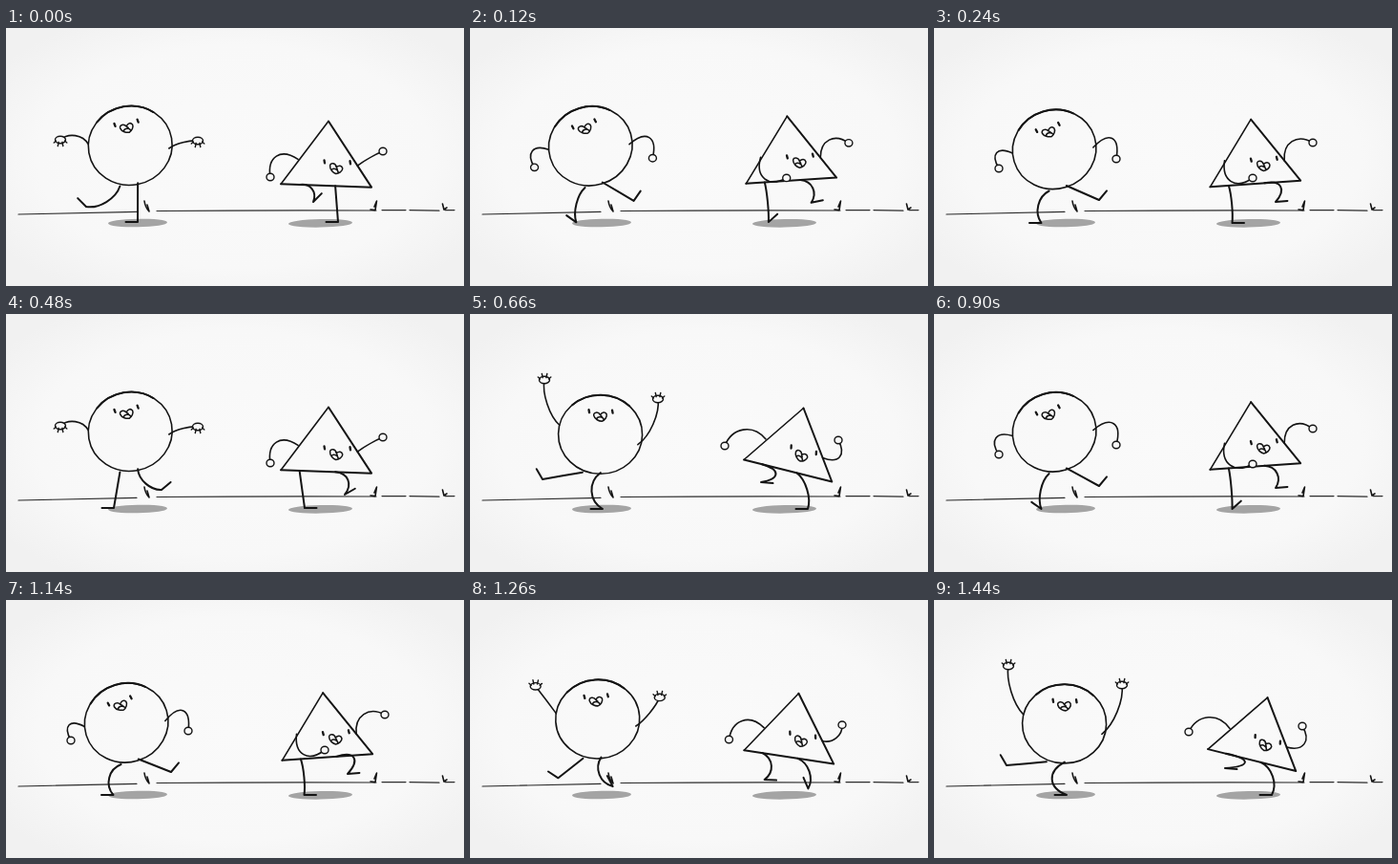
Write an HTML page that moves like this. It is 480x270 px and loops after 1500 ms.

```html
<!DOCTYPE html>
<html lang="en">
<head>
<meta charset="utf-8">
<title>Dancing shapes</title>
<style>
html, body { margin: 0; width: 100%; height: 100%; overflow: hidden; background: #f7f7f7; }
svg { display: block; width: 100vw; height: 100vh; }
path { fill: none; stroke: #141414; stroke-width: 1.6; stroke-linecap: round; stroke-linejoin: round; }
.bold { stroke-width: 2; }
.thin { stroke-width: 1.3; }
.eye { stroke-width: 2.3; }
.hand { fill: #f9f9f9; stroke-width: 1.4; }
.ground { stroke: #2c2c2c; stroke-width: 1.2; }
</style>
</head>
<body>
<svg viewBox="0 0 480 270" xmlns="http://www.w3.org/2000/svg">
  <defs>
    <radialGradient id="paper" cx="50%" cy="50%" r="62%">
      <stop offset="0" stop-color="#fafafa"/>
      <stop offset=".7" stop-color="#f8f8f8"/>
      <stop offset="1" stop-color="#f1f1f1"/>
    </radialGradient>
  </defs>
  <rect width="480" height="270" fill="url(#paper)"/>
  <g fill="#a4a4a4">
    <ellipse cx="138" cy="204" rx="31" ry="4.3" transform="rotate(-1 138 204)"/>
    <ellipse cx="329.5" cy="204.3" rx="33.5" ry="4.3" transform="rotate(-1 330 204)"/>
  </g>
  <path class="ground" d="M13 195 Q70 193.5 137 192.3 M158 191.5 Q270 190.5 388 191 M394 190.6 H419 M423 190.6 L454 191.2 M460 190.6 H470"/>
  <path d="M145 181 Q146 188 150 192 L148 185 M382 190 L387 190.6 L388.5 181 L386 187 M457.5 184 L459 190 L462 188"/>
  <g id="stage"></g>
</svg>
<script>
const LOOP = 1500, STEP = 60, CYCLE = 12.5;

// [beat, pose, hop] along one dance cycle; positive hop is a dip
const beats = [[0, 'pass', 0], [2.5, 'down', -3.5], [4, 'down', 0], [6.5, 'down', 1.5],
  [8, 'swap', 0], [9.5, 'up', 0], [11, 'up', 0], [11.5, 'up', 3.6], [CYCLE, 'pass', 0]];

// Arms are [hand x, y, bow]; legs are [ankle x, y, bow, toe angle].
// Shoulders, hips and face sit on the body and turn with its lean.
const round = {
  x: lean => 136 + lean * .58,
  outline: 'M-44 0 a44 41.3 0 1 1 88 0 a44 41.3 0 1 1 -88 0',
  edge: 'M-30 -30.2 A44 41.3 0 0 1 30 -30.2',
  mouth: [-.5, -18.5, 0], eyes: [-12.5, 12, -24],
  joints: { armL: [-43, -9], armR: [39.5, 10], legL: [-18, 40], legR: [1, 40] },
  toeLift: 10, fingers: { pass: 1, swap: 1, up: -1, down: 0 },
  poses: {
    pass: { lean: -10, y: 123, armL: [57, 117, -9], armR: [201, 118, 3], legL: [84, 187, 9, 225], legR: [138, 203, 0, 180] },
    down: { lean: -17, y: 127, armL: [68, 147, -17], armR: [191, 137, 23], legL: [112.5, 204, -10, 180], legR: [173, 180, 0, 310] },
    up: { lean: 1, y: 126, armL: [78, 69, 7], armR: [197, 89, -8], legL: [76, 173, 0, 240], legR: [139, 204, -14, 180] }
  },
  swap: { legL: [113, 203, 0, 180], legR: [163, 184, -8, 320] }
};
const tri = {
  x: lean => 336 - lean * .2,
  outline: 'M0 -67.5 L-47.5 0',
  edge: 'M0 -67.5 L47.5 0 H-47.5',
  mouth: [9.3, -18, 18], eyes: [-3, 24, -25],
  joints: { armL: [-30.5, -26.5], armR: [32, -22], legL: [-28, 0], legR: [9.5, 0] },
  toeLift: -12, fingers: { pass: 0, swap: 0, up: 0, down: 0 },
  poses: {
    pass: { lean: 2, y: 165, armL: [277, 156, -20], armR: [395, 129, 1], legL: [322, 182, 10, -45], legR: [348, 203, 0, 180] },
    down: { lean: -4, y: 163, armL: [334, 157, -20], armR: [397, 120, 17], legL: [312.5, 204, 2, 0], legR: [358, 182, 17, 355] },
    up: { lean: 14, y: 164, armL: [267, 138, -18], armR: [386, 132, -17], legL: [305, 176, 20, 5], legR: [354, 204, 7, 180] }
  },
  swap: { legL: [313, 203, 0, 0], legR: [355, 189, 12, 330] }
};

const limbs = ['legL', 'legR', 'armL', 'armR'];
const heart = 'M0 -2 C-2 -6 -8 -5 -7 -1 C-6 3 -1 5 2 5 C5 4 8 0 7 -3 C5 -6 2 -5 0 -2 L2 0 M-4 3 C-3 -1 3 0 4 3';
const rad = deg => deg * Math.PI / 180;
const lerp = (a, b, k) => Array.isArray(a) ? a.map((v, i) => lerp(v, b[i], k)) : a + (b - a) * k;

function add(parent, cls, d = '') {
  const el = document.createElementNS('http://www.w3.org/2000/svg', cls === 'group' ? 'g' : 'path');
  el.setAttribute('class', cls);
  if (d) el.setAttribute('d', d);
  return parent.appendChild(el);
}

// A limb from a to b, pushed sideways by bow
function bend([ax, ay], [bx, by], bow) {
  const dx = bx - ax, dy = by - ay, s = bow / Math.hypot(dx, dy);
  const at = k => `${ax + dx * k + dy * s} ${ay + dy * k - dx * s}`;
  return `M${ax} ${ay} C${at(.25)} ${at(.75)} ${bx} ${by}`;
}

// A palm, with a fan of fingers up (-1) or down (1)
function hand(x, y, dir) {
  const rx = dir ? 5.5 : 4, ry = 3.7;
  let d = `M${x - rx} ${y} a${rx} ${ry} 0 1 1 ${2 * rx} 0 a${rx} ${ry} 0 1 1 ${-2 * rx} 0`;
  for (let i = 0; dir && i < 4; i++) {
    const a = rad(25 + i * 43), c = Math.cos(a), s = Math.sin(a) * dir;
    d += ` M${x + c * 5} ${y + s * 2.5} L${x + c * 7.5} ${y + s * 7}`;
  }
  return d;
}

function makeActor(rig) {
  const { poses, joints, mouth, eyes } = rig;
  poses.swap = { ...poses.pass, ...rig.swap };
  const stage = document.getElementById('stage');
  const el = {};
  for (const name of limbs) el[name] = add(stage, name.startsWith('leg') ? 'bold' : '');
  const body = add(stage, 'group');
  add(body, '', rig.outline);
  add(body, 'bold', rig.edge);
  add(body, 'eye', eyes.slice(0, 2).map(x => `M${x} ${eyes[2] - 1.6} l.6 3`).join(' '));
  add(body, '', heart).setAttribute('transform', `translate(${mouth[0]} ${mouth[1]}) rotate(${mouth[2]}) scale(.95)`);
  const hands = { armL: add(stage, 'hand'), armR: add(stage, 'hand') };

  return (from, to, k, hop) => {
    const mix = name => lerp(poses[from][name], poses[to][name], k);
    const lean = mix('lean'), x = rig.x(lean), y = mix('y') + hop;
    const c = Math.cos(rad(lean)), s = Math.sin(rad(lean));
    body.setAttribute('transform', `translate(${x} ${y}) rotate(${lean})`);
    for (const name of limbs) {
      const [jx, jy] = joints[name], [ex, ey, bow, toe] = mix(name);
      const root = [x + jx * c - jy * s, y + jx * s + jy * c];
      if (hands[name]) {
        el[name].setAttribute('d', bend(root, [ex, ey], bow));
        hands[name].setAttribute('d', hand(ex, ey, rig.fingers[k < .5 ? from : to]));
      } else {
        const lift = name === 'legL' ? Math.max(0, -hop) * rig.toeLift : 0;
        const a = rad(toe + lift);
        el[name].setAttribute('d', bend(root, [ex, ey], bow * (1 + hop * .1)) + ` l${12.5 * Math.cos(a)} ${12.5 * Math.sin(a)}`);
      }
    }
  };
}

const actors = [round, tri].map(makeActor);

function draw(ms) {
  const beat = Math.floor((ms % LOOP) / STEP) % CYCLE;
  const n = beats.findIndex(([t]) => t > beat);
  const [t0, from, hop0] = beats[n - 1], [t1, to, hop1] = beats[n];
  const u = (beat - t0) / (t1 - t0), k = u * (2 - u);
  for (const actor of actors) actor(from, to, k, lerp(hop0, hop1, k));
}

function tick() {
  draw(performance.now());
  requestAnimationFrame(tick);
}
tick();
</script>
</body>
</html>
```
